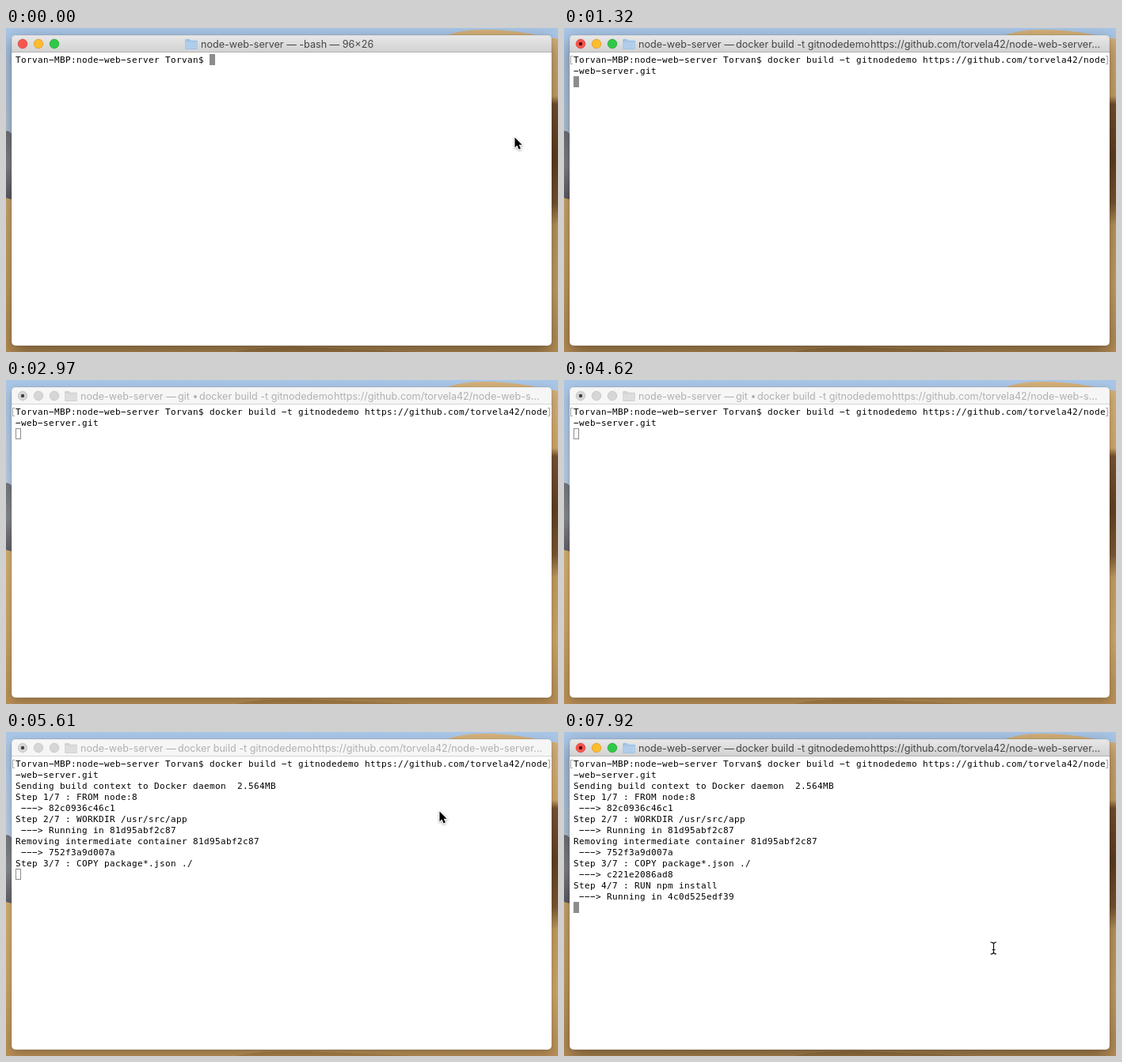
Recreate the animation shown at these times as an HTML page with a canvas. Size 697x410 px, loop 8 s.

```html
<!DOCTYPE html>
<html lang="en">
<head>
<meta charset="utf-8">
<title>Docker build</title>
<style>
  html, body { margin: 0; width: 100%; height: 100%; overflow: hidden; }
  canvas { display: block; }
</style>
</head>
<body>
<canvas id="stage" width="697" height="410"></canvas>
<script>
const ctx = document.getElementById('stage').getContext('2d');
const LOOP = 8000;
const CELL = 7, LINE = 14, LEFT = 12, TOP = 33;
const WIN = [7, 9, 682, 393];

const prompt = 'Torvan-MBP:node-web-server Torvan$ ';
const command = 'docker build -t gitnodedemo https://github.com/torvela42/node-web-server.git';
const typed = prompt + command;
const output = [
  'Sending build context to Docker daemon  2.564MB',
  'Step 1/7 : FROM node:8',
  ' ---> 82c0936c46c1',
  'Step 2/7 : WORKDIR /usr/src/app',
  ' ---> Running in 81d95abf2c87',
  'Removing intermediate container 81d95abf2c87',
  ' ---> 752f3a9d007a',
  'Step 3/7 : COPY package*.json ./',
  ' ---> c221e2086ad8',
  'Step 4/7 : RUN npm install',
  ' ---> Running in 4c0d525edf39'
];

// Title pieces as [x, text]
const titles = {
  bash: { folder: 226, parts: [[246, 'node-web-server — -bash — 96×26']] },
  docker: { folder: 74, parts: [
    [94, 'node-web-server —'], [217, 'docker build -t gitnodedemo'],
    [387, 'https://github.com/torvela42/node-web-server…']] },
  git: { folder: 74, parts: [
    [94, 'node-web-server —'], [217, 'git •'], [244, 'docker build -t gitnodedemo'],
    [414, 'https://github.com/torvela42/node-web-s…']] }
};

const changes = [
  { at: 0, title: 'bash', active: true, running: false, command: false, lines: 0, pointer: ['arrow', 642, 138] },
  { at: 330, command: true },
  { at: 990, title: 'docker', running: true, pointer: null },
  { at: 1980, active: false },
  { at: 2310, title: 'git' },
  { at: 4950, title: 'docker', lines: 5 },
  { at: 5280, lines: 8 },
  { at: 5610, pointer: ['arrow', 547, 100] },
  { at: 5940, active: true, lines: 11, pointer: ['beam', 547, 101] },
  { at: 6270, pointer: ['beam', 542, 248] },
  { at: 6600, pointer: ['beam', 542, 273] }
];

const stateAt = t => Object.assign({}, ...changes.filter(c => c.at <= t));

function gradient(y0, y1, ...stops) {
  const g = ctx.createLinearGradient(0, y0, 0, y1);
  stops.forEach(([at, color]) => g.addColorStop(at, color));
  return g;
}

function fillPath(d, color) {
  ctx.fillStyle = color;
  ctx.fill(new Path2D(d));
}

function circle(x, y, r, fill, stroke) {
  ctx.beginPath();
  ctx.arc(x, y, r, 0, Math.PI * 2);
  ctx.fillStyle = fill;
  ctx.fill();
  if (stroke) {
    ctx.strokeStyle = stroke;
    ctx.lineWidth = 0.8;
    ctx.stroke();
  }
}

function windowPath() {
  ctx.beginPath();
  ctx.roundRect(...WIN, 5);
}

function drawDesert() {
  ctx.fillStyle = gradient(0, 140, [0, '#a9c6e8'], [1, '#bccde2']);
  ctx.fillRect(0, 0, 697, 410);
  fillPath('M0 130 L4 131 L10 136 V222 H0Z', gradient(130, 216, [0, '#73777d'], [0.5, '#84878c'], [1, '#5f6167']));
  fillPath('M0 215 L12 218 V395 H690 V410 H0Z', gradient(215, 410, [0, '#d3ae72'], [0.5, '#cda566'], [1, '#b98f55']));
  fillPath('M556 10 Q574 2 602 2 Q632 2 660 7 L697 14 V410 H680 V14Z',
    gradient(0, 410, [0, '#d6b17a'], [0.21, '#d2a769'], [0.235, '#7a5230'], [0.4, '#62401f'],
      [0.54, '#7d5831'], [0.61, '#c59c60'], [0.8, '#cea669'], [1, '#b98f55']));
  fillPath('M290 410 Q330 401 400 405 L520 410Z', '#a98049');
}

function drawTitleBar(s) {
  const { active, running } = s;
  ctx.fillStyle = active ? gradient(9, 31, [0, '#e8e8e8'], [1, '#d1d1d1']) : '#f6f6f6';
  ctx.fillRect(7, 9, 682, 22);
  ctx.fillStyle = active ? '#b4b4b4' : '#d5d5d5';
  ctx.fillRect(7, 30, 682, 1);

  const lights = [['#f6564f', '#dc433d'], ['#fdbc2f', '#dfa023'], ['#31c748', '#27aa35']];
  lights.forEach(([fill, edge], i) =>
    circle(21 + i * 20, 20, 5.8, active ? fill : '#d6d6d6', active ? edge : '#c4c4c4'));
  if (running) circle(21, 20, 2.2, active ? '#5a0805' : '#404040');

  const { folder, parts } = titles[s.title];
  ctx.save();
  ctx.translate(folder, 14);
  fillPath('M0 1.5 Q0 0 1.5 0 H5.5 L7 1.7 H14.5 Q16 1.7 16 3.2 V11.5 Q16 13 14.5 13 H1.5 Q0 13 0 11.5Z',
    active ? '#9fc2e6' : '#d3d3d3');
  ctx.fillStyle = active ? '#b0cdec' : '#dddddd';
  ctx.fillRect(0.5, 3.5, 15, 8.5);
  ctx.restore();

  ctx.font = '12.6px Inter, sans-serif';
  ctx.fillStyle = active ? '#454545' : '#b0b0b0';
  parts.forEach(([x, text]) => ctx.fillText(text, x, 25));
}

function drawLine(text, row) {
  // The terminal face has full-width dashes
  [...text.replaceAll('-', '−')].forEach((ch, col) =>
    ctx.fillText(ch, LEFT + col * CELL, TOP + row * LINE + 11));
}

function drawBrackets() {
  ctx.strokeStyle = '#a6a6a6';
  ctx.lineWidth = 1;
  ctx.stroke(new Path2D('M11 35.5 H8.5 V45.5 H11 M684 35.5 H686.5 V45.5 H684'));
}

function drawTerminal(s) {
  ctx.font = '11px "DejaVu Sans Mono", monospace';
  ctx.fillStyle = '#000';
  const lines = s.command ? [typed.slice(0, 96), typed.slice(96)] : [prompt];
  lines.push(...output.slice(0, s.lines));
  lines.forEach(drawLine);

  const row = s.running ? lines.length : lines.length - 1;
  const col = s.running ? 0 : lines[row].length;
  const x = LEFT + col * CELL, y = TOP + row * LINE;
  if (s.active) {
    ctx.fillStyle = '#8c8c8c';
    ctx.fillRect(x, y, CELL, LINE);
  } else {
    ctx.strokeStyle = '#8c8c8c';
    ctx.lineWidth = 1;
    ctx.strokeRect(x + 0.5, y + 0.5, CELL - 1, LINE - 1);
  }
  if (s.running) drawBrackets();
}

function drawPointer([kind, x, y]) {
  ctx.save();
  ctx.translate(x, y);
  ctx.lineJoin = 'round';
  if (kind === 'arrow') {
    const shape = new Path2D('M0.5 0.5 V13.2 L3.4 10.5 L5.6 15.6 L7.9 14.6 L5.7 9.7 H9.6Z');
    ctx.shadowColor = 'rgba(0,0,0,.35)';
    ctx.shadowBlur = 3;
    ctx.shadowOffsetY = 1;
    ctx.strokeStyle = '#fff';
    ctx.lineWidth = 2;
    ctx.stroke(shape);
    ctx.shadowColor = 'transparent';
    ctx.fillStyle = '#000';
    ctx.fill(shape);
  } else {
    ctx.strokeStyle = '#111';
    ctx.lineWidth = 1.2;
    ctx.stroke(new Path2D('M-3.5 -7 Q0 -7 0.5 -5 Q1 -7 4 -7 M0.5 -5 V6 M-3.5 8 Q0 8 0.5 6 Q1 8 4 8 M-1.5 2.5 H2.5'));
  }
  ctx.restore();
}

function draw(t) {
  const s = stateAt(t);
  drawDesert();

  ctx.save();
  ctx.shadowColor = s.active ? 'rgba(0,0,0,.42)' : 'rgba(0,0,0,.25)';
  ctx.shadowBlur = s.active ? 22 : 14;
  ctx.shadowOffsetY = s.active ? 8 : 5;
  ctx.fillStyle = '#fff';
  windowPath();
  ctx.fill();
  ctx.restore();

  ctx.save();
  windowPath();
  ctx.clip();
  drawTitleBar(s);
  drawTerminal(s);
  ctx.restore();

  ctx.strokeStyle = 'rgba(0,0,0,.2)';
  ctx.lineWidth = 0.6;
  windowPath();
  ctx.stroke();
  if (s.pointer) drawPointer(s.pointer);
}

const start = performance.now();
function tick() {
  draw((performance.now() - start) % LOOP);
  requestAnimationFrame(tick);
}
tick();
</script>
</body>
</html>
```
